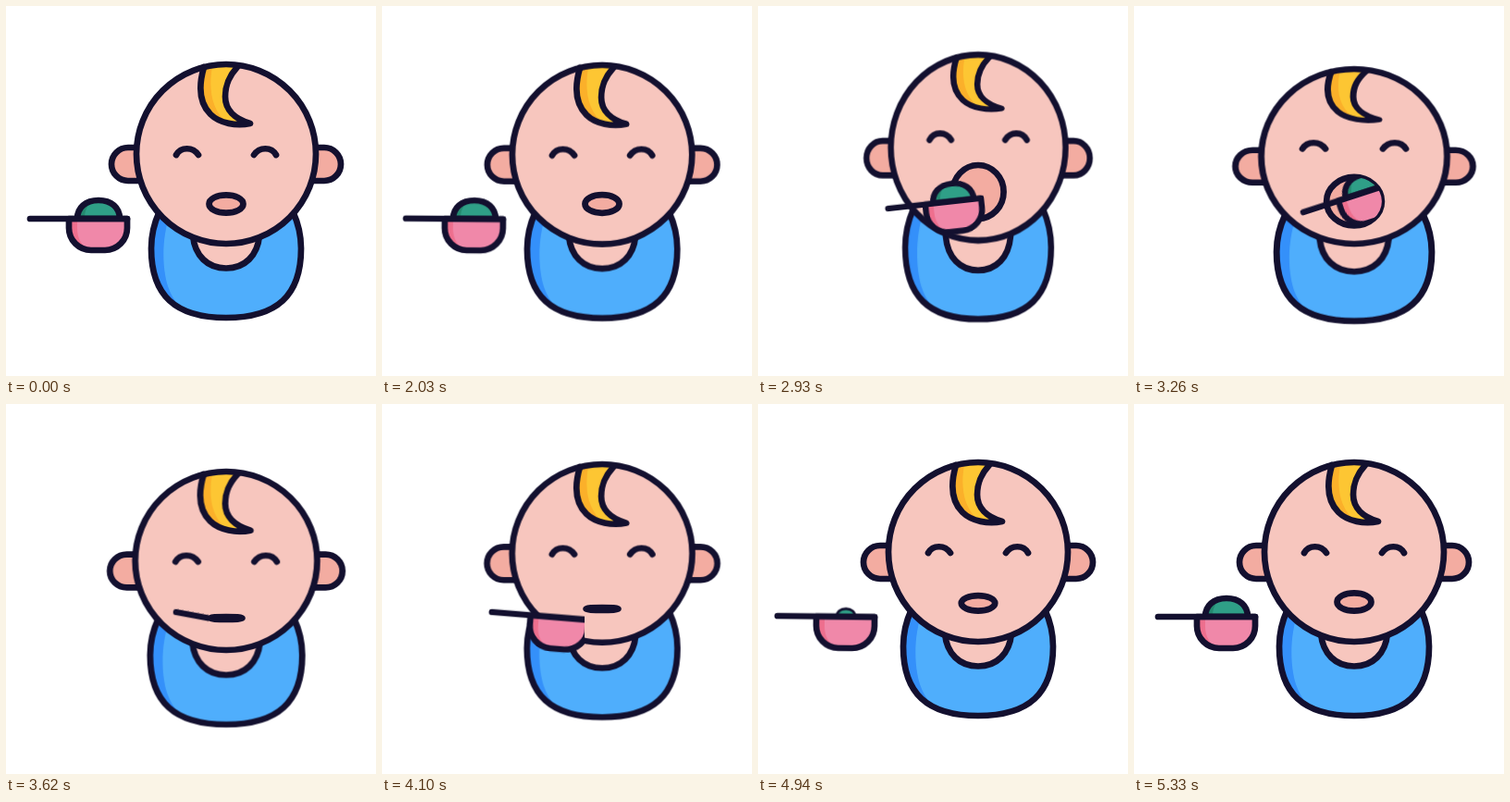
Write an HTML page without scripts that moves like this. It is 400 by 400 pixels and loops after 5360 ms.

```html
<!DOCTYPE html>
<html lang="en">
<head>
<meta charset="utf-8">
<title>Baby being fed</title>
<style>
html, body { margin: 0; width: 100%; height: 100%; overflow: hidden; background: #fff; }
svg { display: block; width: 100vw; height: 100vh; }
.line { stroke: #13102f; stroke-width: 6.7; stroke-linecap: round; stroke-linejoin: round; }
.none { fill: none; }
.skin { fill: #f7c6be; }
.blush { fill: #f3aca1; }

.head, .body, .neck, .face, .hair, .mouth, .reach, .spoon, .food {
  animation: 5360ms ease-in-out infinite;
}
.head { animation-name: head; transform-origin: 238px 160px; }
.body { animation-name: body; transform-origin: 238px 337px; }
.neck { animation-name: neck; }
.face { animation-name: face; }
.hair { animation-name: hair; transform-origin: 238px 66px; }
.mouth { animation-name: mouth; }
.reach { animation-name: reach; animation-timing-function: step-end; }
.spoon { animation-name: spoon; }
.food { animation-name: food; transform-origin: 74px 0; }

@keyframes head {
  0% { transform: none; }
  37.31% { transform: translateY(0) scale(1); animation-timing-function: cubic-bezier(.3, .2, .5, 1); }
  42.35% { transform: translateY(5px) scale(1.018, .98); }
  47.39% { transform: translateY(0) scale(1); }
  57.09% { transform: translateY(-8px) scale(.97, 1.04); animation-timing-function: ease-in; }
  60.82% { transform: translateY(2.5px) scale(1.035, .975); animation-timing-function: ease-out; }
  64.18% { transform: translateY(14px) scale(1.105, .93); }
  67.54% { transform: translateY(9.5px) scale(1.014, .995); }
  72.01% { transform: translateY(-2px) scale(.985, 1.02); }
  78% { transform: translateY(2px) scale(1.007, .99); }
  87%, 100% { transform: translateY(0) scale(1); }
}
@keyframes body {
  0% { transform: none; }
  37.31% { transform: translateY(0) scale(1); animation-timing-function: cubic-bezier(.3, .2, .5, 1); }
  42.35% { transform: translateY(4px) scale(1.018, .99); }
  47.39% { transform: translateY(1.5px) scale(1); }
  57.09% { transform: translateY(1.5px) scale(.97, 1.04); animation-timing-function: ease-in; }
  60.82% { transform: translateY(3.5px) scale(1.035, 1); animation-timing-function: ease-out; }
  64.18% { transform: translateY(11px) scale(1.1, .94); }
  67.54% { transform: translateY(9.5px) scale(1.015, 1); }
  72.01% { transform: translateY(-1px) scale(.985, 1.02); }
  78% { transform: translateY(2px) scale(1.007, .99); }
  87%, 100% { transform: translateY(0) scale(1); }
}
@keyframes neck {
  0%, 37.31%, 67.54%, 100% { transform: translateY(0); }
  47.39%, 57.09% { transform: translateY(2.5px); }
  60.82% { transform: translateY(0); }
}
@keyframes face {
  0%, 37.31%, 66%, 100% { transform: translateY(0); }
  47.39% { transform: translateY(-8.3px); }
  60.82% { transform: translateY(-9.5px); }
}
@keyframes hair {
  0%, 37.31%, 66%, 100% { transform: scaleY(1); }
  47.39%, 60.82% { transform: scaleY(.87); }
}
@keyframes mouth {
  0%, 37.31% { cy: 214px; rx: 18.5px; ry: 9.7px; }
  47.39% { cy: 207.5px; rx: 28px; ry: 28.5px; }
  57.09% { cy: 200px; rx: 27.5px; ry: 29px; animation-timing-function: ease-in; }
  60.82% { cy: 211px; rx: 30px; ry: 26.5px; animation-timing-function: ease-out; }
  64.18% { cy: 234px; rx: 20px; ry: 2px; }
  67.54% { cy: 231.5px; rx: 17.5px; ry: 1.5px; }
  72.01% { cy: 218px; rx: 17.5px; ry: 1.5px; }
  78% { cy: 222px; rx: 17.5px; ry: 1.5px; }
  84.89% { cy: 219.5px; rx: 17.5px; ry: 4px; }
  96%, 100% { cy: 214px; rx: 18.5px; ry: 9.7px; }
}
/* The spoon is hidden outside the lips only while it is in the mouth. */
@keyframes reach {
  0%, 78%, 100% { width: 400px; }
  56.8% { width: 219px; }
}
@keyframes spoon {
  0% { transform: translate(26px, 230px) rotate(0) scale(1); }
  37.31% { transform: translate(26px, 230px) rotate(0) scale(1); animation-timing-function: cubic-bezier(.4, .05, .5, 1); }
  47.39% { transform: translate(14.5px, 206px) rotate(31deg) scale(1); }
  58.4% { transform: translate(180px, 223px) rotate(-18deg) scale(.95); }
  60.82% { transform: translate(183px, 223px) rotate(-18deg) scale(.95); }
  67.54% { transform: translate(184px, 225px) rotate(10.5deg) scale(1); }
  71% { transform: translate(184px, 221px) rotate(7deg) scale(1); animation-timing-function: cubic-bezier(.4, 0, .8, .8); }
  77.61% { transform: translate(101px, 226px) rotate(4deg) scale(1); animation-timing-function: ease-out; }
  84.89% { transform: translate(17px, 227.3px) rotate(1.9deg) scale(1); }
  86.75% { transform: translate(15px, 228px) rotate(1.4deg) scale(1); }
  97.01%, 100% { transform: translate(26px, 230px) rotate(0) scale(1); }
}
@keyframes food {
  0%, 64.5% { transform: scale(1); visibility: visible; }
  64.6%, 88% { transform: scale(0); visibility: hidden; }
  88.1% { transform: scale(0); visibility: visible; }
  97.01%, 100% { transform: scale(1); visibility: visible; }
}
</style>
</head>
<body>
<svg viewBox="0 0 400 400">
  <defs>
    <clipPath id="lips">
      <rect class="reach" width="400" height="400"/>
      <ellipse class="mouth" cx="238" cy="214" rx="18.5" ry="9.7"/>
    </clipPath>
    <path id="torso" d="M166 222C160 235 157 247 157 262C157 313 183 337 238 337S319 313 319 262C319 247 316 235 310 222Z"/>
    <clipPath id="shirt"><use href="#torso"/></clipPath>
    <path id="curl" d="M214 66C207 90 210 106 221 117C231 127 249 130 264 127C247 122 237 112 237 98C237 84 242 75 250 66"/>
    <clipPath id="curlClip"><use href="#curl"/></clipPath>
    <path id="bowl" d="M42 0V10a24 24 0 0 0 24 24H81a24 24 0 0 0 24-24V0Z"/>
    <clipPath id="bowlClip"><use href="#bowl"/></clipPath>
    <path id="scoop" d="M51 0C51-12 60-20 74-20S97-12 97 0Z"/>
    <clipPath id="scoopClip"><use href="#scoop"/></clipPath>
  </defs>

  <g class="body">
    <use href="#torso" fill="#4faefc"/>
    <path clip-path="url(#shirt)" fill="#3490fa" d="M150 215H181C168 245 168 280 175 303C181 321 193 333 211 338H150Z"/>
    <g class="neck"><path class="line skin" d="M202 248C204 270 218 283.500 238 283.500S272 270 274 248"/></g>
    <use href="#torso" class="line none"/>
  </g>

  <g class="head">
    <path class="line blush" d="M144 153H132a18 18 0 0 0 0 36H146M332 153H344a18 18 0 0 1 0 36H330"/>
    <circle class="skin" cx="238" cy="160" r="97"/>
    <g class="hair">
      <path fill="#fdc633" d="M214 66A97 97 0 0 1 250 66L238 90L212 80Z"/>
      <path fill="#fbb02a" d="M214 66L223 64V80H211Z"/>
      <use href="#curl" fill="#fdc633"/>
      <path clip-path="url(#curlClip)" fill="#fbb02a" d="M205 60H224C219 85 219 112 243 130H205Z"/>
      <use href="#curl" class="line none"/>
    </g>
    <circle class="line none" cx="238" cy="160" r="97"/>
    <path class="line none face" d="M184 161C189 152 202 152 208 161M268 161C274 152 287 152 292 161"/>
  </g>

  <ellipse class="mouth line blush" cx="238" cy="214" rx="18.5" ry="9.7"/>
  <g clip-path="url(#lips)">
    <g class="spoon">
      <g class="food">
        <use href="#scoop" fill="#2f9f87"/>
        <path clip-path="url(#scoopClip)" fill="#248a70" d="M48 0V-22H70C62-16 59-9 59 0Z"/>
        <use href="#scoop" class="line none"/>
      </g>
      <use href="#bowl" fill="#f088a9"/>
      <path clip-path="url(#bowlClip)" fill="#ee6f8e" d="M40 0H51V10C51 22 56 30 66 35H40Z"/>
      <use href="#bowl" class="line none"/>
      <path class="line none" d="M0 0H105"/>
    </g>
  </g>
</svg>
</body>
</html>
```
